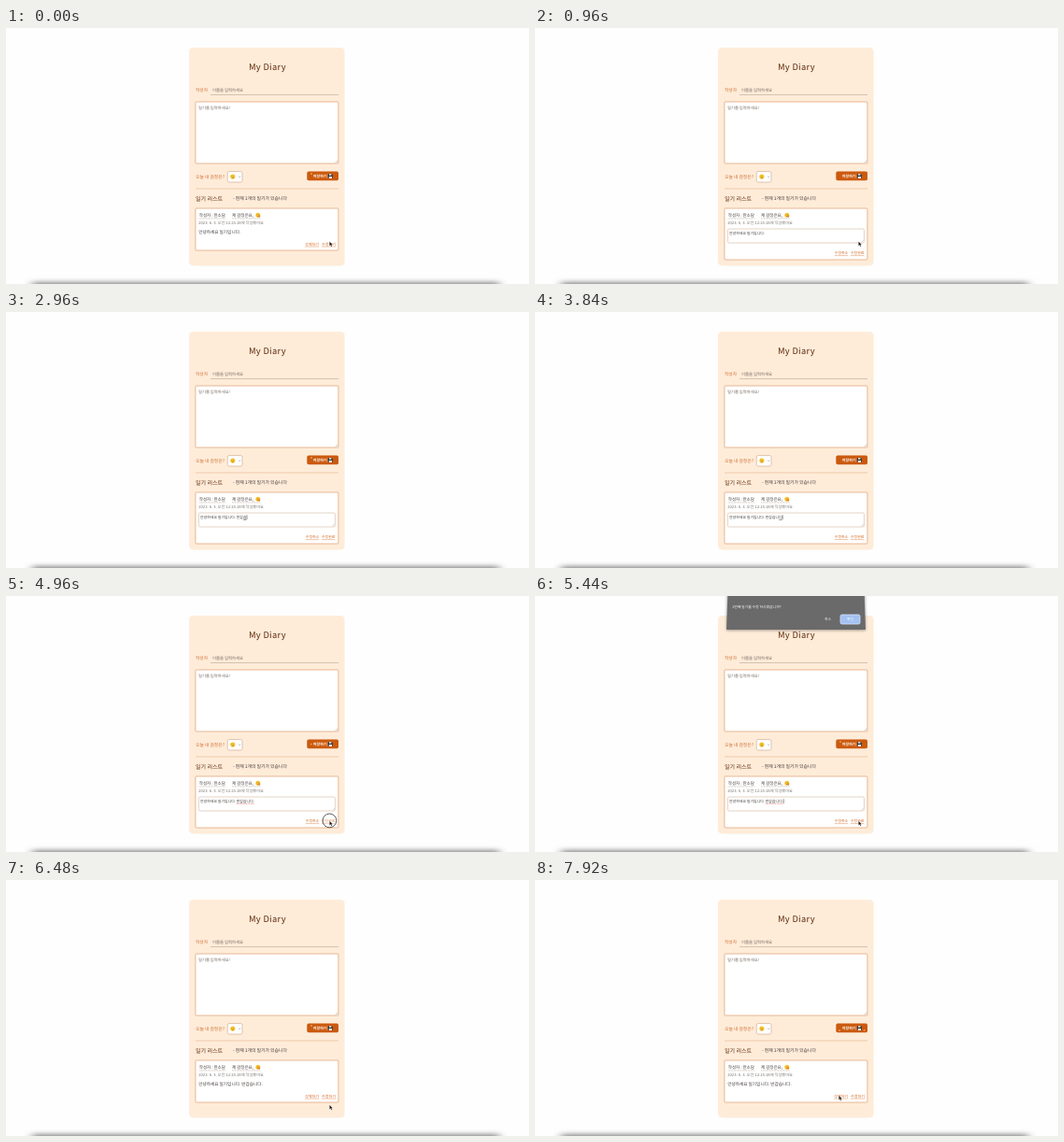
Write an HTML page that moves like this. It is 560 by 274 pixels and loops after 8 s.

```html
<!DOCTYPE html>
<html>
<head>
<meta charset="utf-8">
<title>My Diary</title>
<style>
  html, body { margin: 0; width: 100%; height: 100%; overflow: hidden; background: #fefefe; }
  svg { display: block; width: 560px; height: 274px; }
  text {
    font-family: "Noto Sans CJK KR", "Noto Sans CJK", "Noto Sans", sans-serif;
    text-rendering: geometricPrecision;
    white-space: pre;
  }
  .box { fill: #fff; stroke: #e3a67c; stroke-width: .8; }
  .rule { stroke: #b9a593; stroke-width: .6; }
  .link { stroke: #dd8a52; stroke-width: .5; }
</style>
</head>
<body>
<svg id="stage" viewBox="0 0 560 274">
  <defs>
    <filter id="soft" x="-10%" y="-300%" width="120%" height="700%"><feGaussianBlur stdDeviation="5 2.6"/></filter>
    <filter id="drop" x="-10%" y="-20%" width="120%" height="150%"><feGaussianBlur stdDeviation="1.6"/></filter>
  </defs>
  <rect x="28" y="272" width="500" height="8" fill="#8a8a8a" filter="url(#soft)"/>
  <rect x="196" y="21" width="166.6" height="233.5" rx="4.5" fill="#feecd9"/>

  <g id="form">
    <path class="rule" d="M219 71.5H356"/>
    <rect class="box" x="202.9" y="79" width="153" height="66" rx=".8"/>
    <path d="M352.6 144.2l2.6-2.6M354.2 144.2l1-1" stroke="#888" stroke-width=".4"/>
    <rect x="237.2" y="153.6" width="15.8" height="11.4" rx="1.6" fill="#fff" stroke="#d3ad91" stroke-width=".7"/>
    <path d="M249 158.7l1.1 1.1 1.1-1.1" fill="none" stroke="#777" stroke-width=".5"/>
    <rect x="322.3" y="153.6" width="33.7" height="9.6" rx="1.8" fill="#cb5a0e"/>
    <path d="M345 156.2h3.8l1.1 1.1v3.6h-4.9z" fill="#32363c"/>
    <path d="M346 156.2h2.4v1.6h-2.4zM345.8 159h3.3v1.9h-3.3z" fill="#f4f4f4"/>
    <path d="M203 172H356" stroke="#e5b893" stroke-width=".7"/>
  </g>

  <g id="entry">
    <rect id="item" class="box" x="202.9" y="193" width="153" height="45" rx="1"/>
    <path class="rule" d="M206.6 203.9H235.4M242 203.9H272.5" stroke-dasharray="1 .5"/>
  </g>

  <g id="view"></g>
  <g id="edit">
    <rect x="206.4" y="215" width="146" height="15" rx="1.4" fill="#fff" stroke="#d8c2b1" stroke-width=".7"/>
    <path d="M349.8 229.2l1.9-1.9" stroke="#888" stroke-width=".4"/>
    <path id="mark" stroke-width=".55"/>
    <path id="caret" stroke="#222" stroke-width=".5"/>
  </g>

  <g id="sparks" fill="#ffe2a6"></g>

  <g id="dialog">
    <path d="M206 -20H353L354 37H205Z" fill="#000" opacity=".35" filter="url(#drop)"/>
    <path d="M207 -20H352L354 36H205Z" fill="#6a6a6a"/>
    <rect x="327" y="20" width="21" height="10" rx="1.6" fill="#a4c2f2" stroke="#d5e3fa" stroke-width=".8"/>
  </g>

  <circle id="ring" r="7.4" fill="#fff" fill-opacity=".25" stroke="#333" stroke-width=".8"/>
  <path id="cursor" d="M0 0V4.6L1.1 3.7 1.9 5.4 2.8 5 2 3.4H3.4Z" fill="#111" stroke="#fff" stroke-width=".25"/>
</svg>
<script>
const LOOP = 8000, STEP = 80;
const EDIT = 720, SAVE = 5720;
const BASE = "안녕하세요 일기입니다.";
const $ = id => document.getElementById(id);

function add(parent, tag, attrs) {
  const el = document.createElementNS("http://www.w3.org/2000/svg", tag);
  for (const k in attrs) el.setAttribute(k, attrs[k]);
  return $(parent).appendChild(el);
}

function label(parent, x, y, size, fill, str, weight = 400) {
  const el = add(parent, "text", { x, y, fill, "font-size": size, "font-weight": weight });
  el.textContent = str;
  return el;
}

function link(parent, x, y, size, str) {
  label(parent, x, y, size, "#d2661f", str);
  add(parent, "path", { class: "link", d: `M${x} ${y + 1.2}h${size * 3.7}` });
}

function face(parent, x, y, r) {
  add(parent, "circle", { cx: x, cy: y, r, fill: "#f7c533" });
  add(parent, "path", {
    d: `M${x - r * .5} ${y - r * .25}h.6M${x + r * .3} ${y - r * .25}h.6M${x - r * .4} ${y + r * .4}h${r * .8}`,
    stroke: "#7b4a12", "stroke-width": .5
  });
}

const ink = "#3b3532", rust = "#cf6a2c", brown = "#5c2709";
const title = label("form", 260, 44.6, 9.3, brown, "My Diary", 500);
title.setAttribute("letter-spacing", .3);
label("form", 203, 68.4, 4.7, rust, "작성자");
label("form", 221, 68.2, 4.35, "#75685f", "이름을 입력하세요");
label("form", 206, 87, 4.3, "#75685f", "일기를 입력하세요!");
label("form", 203, 161, 4.8, rust, "오늘 내 감정은?");
label("form", 328.8, 160, 4.1, "#fff", "저장하기", 700);
label("form", 203, 184.8, 6, brown, "일기 리스트");
label("form", 243, 184, 4.87, ink, "- 현재 1개의 일기가 있습니다");
face("form", 242.8, 159.1, 2.6);

label("entry", 206.8, 202, 4.5, ink, "작성자 : 한소담");
label("entry", 242, 202, 4.5, ink, "제 감정은요,");
face("entry", 269.8, 200.3, 2.5);
add("entry", "circle", { cx: 271.2, cy: 201.6, r: 1, fill: "#e8702f" });
label("entry", 206.2, 210.3, 4.24, "#7d7670", "2023. 6. 3. 오전 12:25:18에 작성했어요");

const body = label("view", 206.2, 220, 4.65, ink, BASE);
link("view", 320, 232.8, 4.1, "삭제하기");
link("view", 338, 232.8, 4.1, "수정하기");

const draft = label("edit", 208, 221, 3.92, ink, BASE);
link("edit", 320.8, 242.4, 3.9, "수정취소");
link("edit", 338, 242.4, 3.9, "수정완료");

label("dialog", 211, 13, 3.85, "#fff", "1번째 일기를 수정 하시겠습니까?", 500);
label("dialog", 310, 26.4, 3.8, "#f4f4f4", "취소");
label("dialog", 334, 26.4, 3.8, "#fff", "확인", 500);

// [time, text added after the saved sentence]
const typed = [
  [0, ""], [1680, " "], [1840, " ㅂ"], [1920, " 바"], [2000, " 반"],
  [2240, " 반ㄱ"], [2400, " 반가"], [2560, " 반갑"], [2720, " 반갑ㅅ"],
  [2880, " 반갑스"], [2960, " 반갑습"], [3120, " 반갑습ㄴ"], [3280, " 반갑습니"],
  [3440, " 반갑습니ㄷ"], [3600, " 반갑습니다"], [4000, " 반갑습니다."]
];

// [time, x, y] of the pointer tip
const path = [
  [0, 346.4, 228.6], [4480, 346.4, 228.6], [4800, 346.4, 240.8],
  [6800, 346.4, 240.8], [7440, 325.4, 230.8], [8000, 325.4, 230.8]
];

// [phase, dots on the save button]
const twinkle = [
  [0, [[327, 156]]], [720, []], [1500, [[326.8, 158.6]]],
  [2060, [[326, 161], [352.6, 160.8]]], [2500, [[327, 156]]]
];

const sparks = [0, 1].map(() => add("sparks", "circle", { r: .65 }));
const at = (table, t) => table.filter(row => row[0] <= t).pop()[1];
const clamp = v => Math.max(0, Math.min(1, v));
const show = (el, on) => el.setAttribute("visibility", on ? "visible" : "hidden");

function pointer(t) {
  const i = path.findIndex((p, n) => n && t <= p[0]);
  const [a, b] = [path[i - 1], path[i]];
  const p = (t - a[0]) / (b[0] - a[0]);
  const e = p * p * (3 - 2 * p);
  return [a[1] + (b[1] - a[1]) * e, a[2] + (b[2] - a[2]) * e];
}

function drawDraft(t) {
  const more = at(typed, t);
  draft.textContent = BASE + more;
  const end = 208 + draft.getComputedTextLength();
  $("caret").setAttribute("d", `M${end + .4} 217.3v4.6`);
  const blink = t % 1000 < 500;
  show($("caret"), t >= EDIT && t < SAVE && (blink || (t > 1600 && t < 4000)));

  const composing = more.length > 1 && t < 4000;
  const checked = t >= 4000;
  const width = composing ? 3.6 : 19.2;
  $("mark").setAttribute("d", `M${end - width} 222.3H${end}`);
  $("mark").setAttribute("stroke", checked ? "#d4574c" : ink);
  $("mark").setAttribute("stroke-dasharray", checked ? "1 .5" : "none");
  show($("mark"), t < SAVE && (composing || checked));
}

function draw(t) {
  const editing = t >= EDIT && t < SAVE;
  show($("view"), !editing);
  show($("edit"), editing);
  $("item").setAttribute("height", editing ? 55 : 45);
  body.textContent = BASE + (t >= SAVE ? " 반갑습니다." : "");
  drawDraft(t);

  const dots = at(twinkle, t % 2920);
  sparks.forEach((s, i) => {
    show(s, i < dots.length);
    if (dots[i]) {
      s.setAttribute("cx", dots[i][0]);
      s.setAttribute("cy", dots[i][1]);
    }
  });

  const rise = 1 - clamp((t - 5200) / 240);
  const leave = clamp((t - SAVE) / 255);
  const hidden = Math.max(rise * rise, leave * leave);
  $("dialog").setAttribute("transform", `translate(0 ${-36 * hidden})`);
  show($("dialog"), hidden < 1);

  const [x, y] = pointer(t);
  $("cursor").setAttribute("transform", `translate(${x} ${y})`);
  show($("cursor"), t < 1680 || t >= 4480);
  $("ring").setAttribute("cx", x);
  $("ring").setAttribute("cy", y - .4);
  show($("ring"), (t >= 480 && t < EDIT) || (t >= 4880 && t < 5120));
}

const start = performance.now();
function tick() {
  const t = (performance.now() - start) % LOOP;
  draw(Math.floor(t / STEP) * STEP);
  requestAnimationFrame(tick);
}
draw(0);
tick();
</script>
</body>
</html>
```
